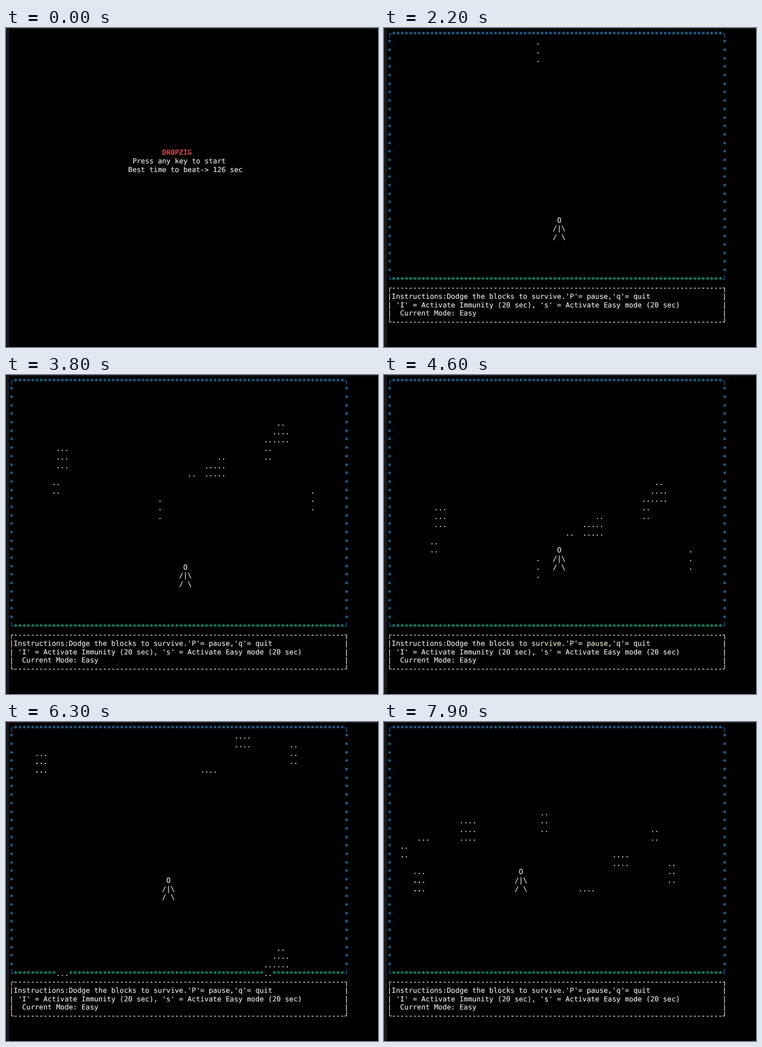
These frames come from a looping animation (600x516 px, 8000 ms). An HTML page:

```html
<!DOCTYPE html>
<html lang="en">
<head>
<meta charset="utf-8">
<title>Terminal dodge game</title>
<style>
  html, body { margin: 0; width: 100%; height: 100%; overflow: hidden; background: #181818; }
  svg { display: block; width: 600px; height: 516px; }
  text {
    font: 11.364px "DejaVu Sans Mono", monospace;
    white-space: pre;
    text-rendering: geometricPrecision;
    fill: #ebe9df;
    stroke: #ebe9df;
    stroke-width: 0.15;
  }
  .red { fill: #dd4648; stroke: none; font-weight: bold; }
  .blue { fill: #2f86c0; stroke: #2f86c0; }
  .green { fill: #12b890; stroke: #12b890; }
  path { fill: none; stroke-width: 1; }
</style>
</head>
<body>
<svg viewBox="0 0 600 516">
  <rect x="5" y="2" width="595" height="514" fill="#000"/>
  <g id="title"></g>
  <g id="game"></g>
</svg>
<script>
const NS = 'http://www.w3.org/2000/svg';
const CELL = 6.842, LINE = 13.69, LEFT = 5.5, BASE = 13.6;
const LAST = 79, INNER = 78, FLOOR = 29;
const LOOP = 8000, KEY_PRESS = 12, START = 22;
const WAVE_GAP = 30;
const title = document.getElementById('title');
const game = document.getElementById('game');

function add(parent, tag, attrs) {
  const el = document.createElementNS(NS, tag);
  for (const key in attrs) el.setAttribute(key, attrs[key]);
  return parent.appendChild(el);
}

function put(parent, row, col, str, cls = '') {
  const el = add(parent, 'text', { x: LEFT + col * CELL, y: BASE + row * LINE, class: cls });
  el.textContent = str;
  return el;
}

// Four box-drawing corners around the rows top..bottom
function corners(top, bottom, stroke) {
  const w = CELL / 2, h = LINE / 2;
  const x1 = LEFT + w, x2 = x1 + LAST * CELL;
  const [y1, y2] = [top, bottom].map(r => Math.round(r * LINE + 9.4) + 0.5);
  const d = `M${x1 + w} ${y1}H${x1}v${h}M${x2 - w} ${y1}H${x2}v${h}` +
            `M${x1 + w} ${y2}H${x1}v${-h}M${x2 - w} ${y2}H${x2}v${-h}`;
  add(game, 'path', { d, stroke });
}

put(title, 14, 36, 'DROPZIG', 'red');
put(title, 15, 29, 'Press any key to start');
put(title, 16, 28, 'Best time to beat-> 126 sec');

put(game, 0, 1, '*'.repeat(INNER), 'blue');
for (let r = 1; r < FLOOR; r++) {
  put(game, r, 0, '*', 'blue');
  put(game, r, LAST, '*', 'blue');
}
corners(0, FLOOR, '#2f62c4');
const ground = put(game, FLOOR, 1, '', 'green');

const help = [
  "|Instructions:Dodge the blocks to survive.'P'= pause,'q'= quit",
  "| 'I' = Activate Immunity (20 sec), 's' = Activate Easy mode (20 sec)",
  '|  Current Mode: Easy'
];
put(game, 30, 1, '-'.repeat(INNER));
help.forEach((str, i) => put(game, 31 + i, 0, str.padEnd(LAST) + '|'));
put(game, 34, 1, '-'.repeat(INNER));
corners(30, 34, '#ebe9df');

const live = add(game, 'g', {});

// Start columns: a wave drops one block per tick
const waves = [
  [35, 71, 10, 42, 46, 49, 11, 60, 62, 63],
  [45, 6, 6, 66, 53, 3, 7, 62, 17, 36]
];

// Blocks widen over the first drops, then alternate narrow and wide
const blocks = waves.flatMap((cols, wave) => cols.map((col, k) => {
  const i = wave * cols.length + k;
  const wide = k % 2 ? 2 : k % 4 ? 3 : 4;
  return {
    col,
    born: wave * WAVE_GAP + k,
    w: Math.min(1 + (i >> 1), wide),
    h: Math.round(2.3 + Math.cos(i))
  };
}));

// Player key points: tenth of a second, column, row
const path = [[37, 40, 22], [38, 41, 22], [53, 39, 19], [63, 37, 18], [79, 31, 17]];

function playerAt(k) {
  const next = path.findIndex(p => p[0] >= k);
  const b = path[next], a = path[Math.max(next - 1, 0)];
  const f = a === b ? 0 : (k - a[0]) / (b[0] - a[0]);
  return [1, 2].map(i => Math.round(a[i] + (b[i] - a[i]) * f));
}

function draw(k) {
  title.style.display = k < KEY_PRESS ? '' : 'none';
  game.style.display = k < START ? 'none' : '';
  if (k < START) return;

  // The game rests for one beat in every six
  const tick = k - START - Math.floor((k - 20) / 6);
  const floor = Array(INNER).fill('*');
  live.replaceChildren();

  for (const { col, born, w, h } of blocks) {
    if (tick < born) continue;
    for (let i = 0; i < h; i++) {
      const row = 1 + tick - born + i;
      if (row > FLOOR) break;
      put(live, row, col, '.'.repeat(w));
      if (row === FLOOR) floor.fill(' ', col - 1, col - 1 + w);
    }
  }
  ground.textContent = floor.join('');

  const [col, row] = playerAt(k);
  [' O', '/|\\', '/ \\'].forEach((part, i) => put(live, row + i, col - 1, part));
}

let shown = -1;
const begin = performance.now();
function loop() {
  const k = Math.floor((performance.now() - begin) % LOOP / 100);
  if (k !== shown) draw(shown = k);
  requestAnimationFrame(loop);
}
loop();
</script>
</body>
</html>
```
